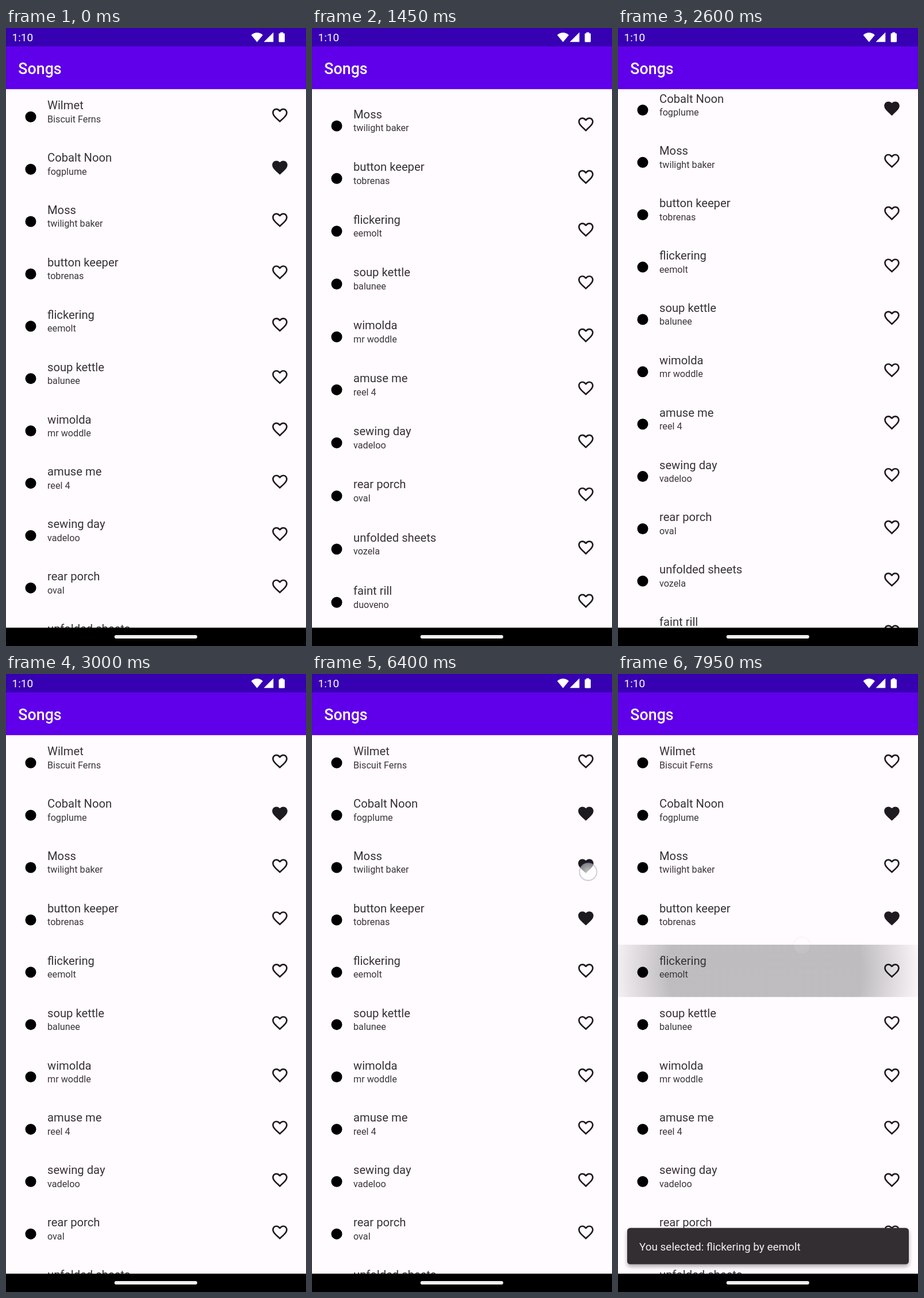
An HTML page for the animation above (8 s loop, 522 by 1073 pixels).

```html
<!DOCTYPE html>
<html lang="en">
<head>
<meta charset="utf-8">
<title>Songs</title>
<style>
  html, body { margin: 0; width: 100%; height: 100%; overflow: hidden; background: #fffbfe; }
  svg { display: block; width: 100vw; height: 100vh; }
  text { font-family: Roboto, "Noto Sans", sans-serif; white-space: pre; }
  .name { font-size: 20.2px; fill: #353337; }
  .artist { font-size: 16.2px; fill: #38363a; }
</style>
</head>
<body>
<svg viewBox="0 0 522 1073" preserveAspectRatio="none">
  <defs>
    <clipPath id="view"><rect y="106" width="522" height="936"/></clipPath>
    <path id="full" d="M12 21.35l-1.45-1.32C5.4 15.36 2 12.28 2 8.5 2 5.42 4.42 3 7.5 3c1.74 0 3.41.81 4.5 2.09C13.09 3.81 14.76 3 16.5 3 19.58 3 22 5.42 22 8.5c0 3.78-3.4 6.86-8.55 11.54z"/>
    <path id="hollow" d="M16.5 3c-1.74 0-3.41.81-4.5 2.09C10.91 3.81 9.24 3 7.5 3 4.42 3 2 5.42 2 8.5c0 3.78 3.4 6.86 8.55 11.54L12 21.35l1.45-1.32C18.6 15.36 22 12.28 22 8.5 22 5.42 19.58 3 16.5 3zm-4.4 15.55l-.1.1-.1-.1C7.14 14.24 4 11.39 4 8.5 4 6.5 5.5 5 7.5 5c1.54 0 3.04.99 3.57 2.36h1.87C13.46 5.99 14.96 5 16.5 5c2 0 3.5 1.5 3.5 3.5 0 2.89-3.14 5.74-7.9 10.05z"/>
    <radialGradient id="soft">
      <stop offset=".6" stop-opacity=".25"/><stop offset="1" stop-opacity="0"/>
    </radialGradient>
    <radialGradient id="wave" href="#soft" gradientUnits="userSpaceOnUse"/>
    <radialGradient id="tip">
      <stop offset="0" stop-color="#fff" stop-opacity=".75"/>
      <stop offset="1" stop-color="#fff" stop-opacity=".45"/>
    </radialGradient>
    <filter id="shade" x="-5%" y="-30%" width="110%" height="160%">
      <feDropShadow dx="0" dy="4" stdDeviation="3.5" flood-opacity=".33"/>
    </filter>
  </defs>

  <rect width="522" height="1073" fill="#fffbfe"/>
  <g clip-path="url(#view)">
    <rect id="band" y="470" width="522" height="90.8" fill="url(#wave)"/>
    <circle id="pulse" cx="476.5" fill="url(#soft)"/>
    <g id="list"></g>
  </g>

  <rect y="31" width="522" height="75.2" fill="#6000ea"/>
  <rect width="522" height="32" fill="#3700b3"/>
  <text x="21.3" y="79.5" font-size="26.8" font-weight="500" fill="#fff">Songs</text>
  <g fill="#fff">
    <text x="10.5" y="23.3" font-size="19">1:10</text>
    <path d="M426.7 12.3Q436.8 3.9 446.9 12.3L436.8 24.5Z"/>
    <path d="M465.3 7.6V24.3H448.6Z"/>
    <path d="M477.3 9.2V7.6H482.3V9.2H483.6Q485 9.2 485 10.6V23.2Q485 24.6 483.6 24.6H476Q474.6 24.6 474.6 23.2V10.6Q474.6 9.2 476 9.2Z"/>
  </g>

  <g id="bar">
    <rect x="16" y="961.8" width="490" height="63" rx="5.3" fill="#322f33" filter="url(#shade)"/>
    <text id="note" x="37" y="1000.6" font-size="18.9" fill="#f4eff4"></text>
  </g>
  <rect y="1041.2" width="522" height="31.8" fill="#000"/>
  <rect x="188.7" y="1054.1" width="144" height="5.8" rx="2.9" fill="#f0f0f0"/>
  <circle id="touch" r="15" fill="url(#tip)" stroke="#9896be" stroke-opacity=".5" stroke-width="1.8"/>
</svg>

<script>
const LOOP = 8000, STEP = 50;
const TOP = 106.5, PITCH = 90.87, VIEW = 935, MAX = 155.4;

const songs = [
  ["Wilmet", "Biscuit Ferns"], ["Cobalt Noon", "fogplume"], ["Moss", "twilight baker"],
  ["button keeper", "tobrenas"], ["flickering", "eemolt"], ["soup kettle", "balunee"],
  ["wimolda", "mr woddle"], ["amuse me", "reel 4"], ["sewing day", "vadeloo"],
  ["rear porch", "oval"], ["unfolded sheets", "vozela"], ["faint rill", "duoveno"]
];

// [ms, list offset]; anything beyond MAX stretches the list
const track = [
  [650, 0], [700, 3], [750, 10], [850, 42], [1000, 94], [1100, 125], [1200, 148], [1300, 158],
  [1450, 166.3], [1550, 167.2], [1650, 174], [1750, 177.4], [1850, 176.5], [2000, 171],
  [2200, 165.2], [2350, 159], [2400, 153], [2500, 134], [2650, 87], [2800, 36],
  [2900, 11], [2950, 3], [3000, 0]
];

const taps = [
  { at: 4050, end: 4400, x: 488.5, y: 336, row: 2, r: 20 },
  { at: 5000, end: 5350, x: 484, y: 431, row: 3, r: 24 },
  { at: 6400, end: 6850, x: 480.5, y: 343.5, row: 2, r: 30 },
  { at: 7650, end: 8000, x: 320, y: 472 }
];

const $ = id => document.getElementById(id);
const clamp = v => Math.max(0, Math.min(1, v));
const mix = (a, b, u) => a + (b - a) * u;
const easeOut = u => 1 - (1 - u) ** 2;
const set = (el, attrs) => { for (const k in attrs) el.setAttribute(k, attrs[k]); };

function make(tag, parent, attrs, text) {
  const el = document.createElementNS("http://www.w3.org/2000/svg", tag);
  set(el, attrs);
  if (text) el.textContent = text;
  return parent.appendChild(el);
}

const rows = songs.map(([name, artist]) => {
  const g = make("g", $("list"), {});
  make("circle", g, { cx: 43, cy: 47.8, r: 9.5, fill: "#000" });
  make("text", g, { class: "name", x: 72, y: 34.8 }, name);
  make("text", g, { class: "artist", x: 72, y: 57.2 }, artist);
  const heart = make("use", g, { transform: "translate(460.55 29.1) scale(1.329)", fill: "#1d1b20" });
  return { g, heart };
});
$("note").textContent = `You selected: ${songs[4][0]} by ${songs[4][1]}`;

function offsetAt(t) {
  const i = track.findIndex(p => p[0] > t);
  if (i < 1) return 0;
  const [t0, a] = track[i - 1], [t1, b] = track[i];
  return mix(a, b, (t - t0) / (t1 - t0));
}

function drawList(t) {
  const offset = offsetAt(t);
  const scroll = Math.min(offset, MAX), pull = offset - scroll;
  const liked = new Set([1]);
  for (const { at, row } of taps) {
    if (row === undefined || t < at + 100) continue;
    liked.has(row) ? liked.delete(row) : liked.add(row);
  }
  rows.forEach(({ g, heart }, i) => {
    const y = i * PITCH - scroll;
    const u = (y + 28) / VIEW;
    const shift = pull * (1 - .3 * u - .7 * u * u);
    set(g, { transform: `translate(0 ${TOP + y - shift})` });
    set(heart, { href: liked.has(i) ? "#full" : "#hollow" });
  });
}

function drawTap(t) {
  const tap = taps.find(p => t >= p.at && t < p.end);
  const age = tap ? t - tap.at : 0;
  set($("touch"), {
    cx: tap ? tap.x : 0, cy: tap ? tap.y : 0,
    opacity: tap ? 1 - clamp((age - 150) / 175) : 0
  });

  const onHeart = tap && tap.r;
  const grow = easeOut(clamp((age - 50) / 200));
  set($("pulse"), {
    cy: onHeart ? TOP + tap.row * PITCH + 45 : 0,
    r: onHeart ? tap.r * mix(.3, 1, grow) : 0,
    opacity: onHeart && age > 50 ? 1 - clamp((t - tap.end + 200) / 200) : 0
  });

  const onRow = tap && !tap.r;
  const spread = clamp((age - 50) / 250);
  set($("wave"), {
    cx: mix(320, 256, spread), cy: mix(472, 515, spread), r: mix(60, 280, easeOut(spread))
  });
  set($("band"), { opacity: onRow ? clamp(age / 100 - .5) : 0 });

  const show = clamp((t - 7750) / 150);
  const size = mix(.8, 1, easeOut(show));
  set($("bar"), {
    opacity: clamp(show * 2),
    transform: `translate(261 993.3) scale(${size}) translate(-261 -993.3)`
  });
}

const start = performance.now();
function frame() {
  const now = Math.max(0, performance.now() - start) % LOOP;
  const t = Math.floor(now / STEP) * STEP;
  drawList(t);
  drawTap(t);
  requestAnimationFrame(frame);
}
frame();
</script>
</body>
</html>
```
